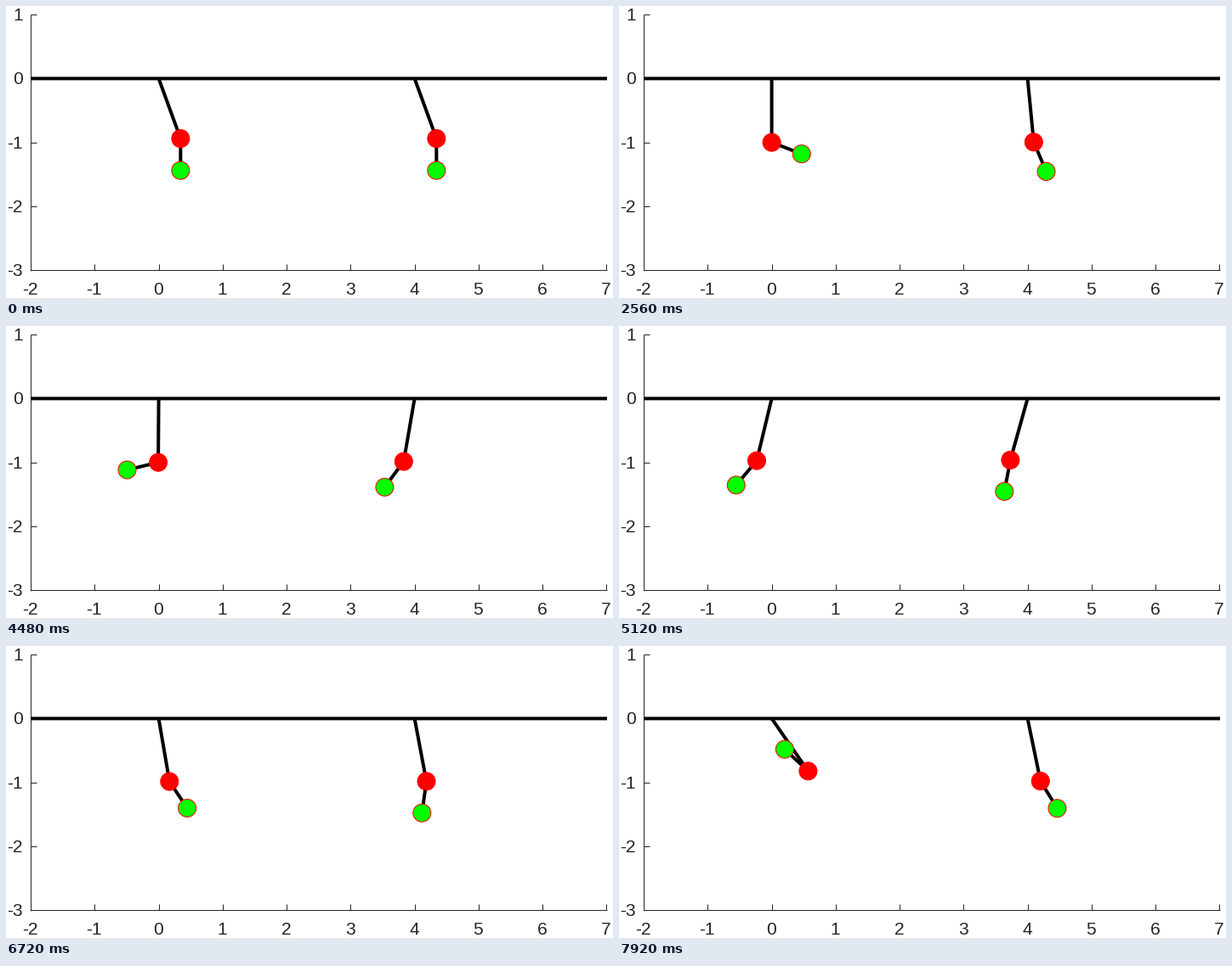
Write a matplotlib script that moves like this. It is 714 px wide and 344 px high and loops after 8 s.

```python
import numpy as np
import matplotlib.pyplot as plt
from matplotlib.animation import FuncAnimation
from matplotlib.patches import Circle

W, H, DPI = 714, 344, 64
PT = 72 / DPI                     # points per pixel
FRAMES, STEP = 100, 80
LEFT, BOTTOM, UNIT = 29.1, 311.2, 75.25
INK = "#262626"
L1, L2 = 1.0, 0.5
RELEASE = 20.2                    # frame at which the swing begins


def px(x):
    return LEFT + (x + 2) * UNIT


def py(y):
    return BOTTOM - (y + 3) * UNIT


def spline(*keys):
    """Smooth curve through (frame, value) keys, held at both ends."""
    t, v = np.array(keys, float).T
    m = np.gradient(v, t)

    def at(f):
        f = min(max(f, t[0]), t[-1])
        i = min(np.searchsorted(t, f, "right") - 1, len(t) - 2)
        h = t[i + 1] - t[i]
        s = (f - t[i]) / h
        return ((1 + 2 * s) * (1 - s) ** 2 * v[i] + s * (1 - s) ** 2 * h * m[i]
                + s * s * (3 - 2 * s) * v[i + 1] + s * s * (s - 1) * h * m[i + 1])

    return at


# Turning points of the driven pendulum, degrees from straight down
hip = spline((18, 20), (22, 19.6), (26, 16), (38, -11.9), (42, -8.3),
             (56, -0.4), (68, -17), (73, -12.7), (84, 9.7), (99, 34.7))
knee = spline((18, 0), (22, 1), (34, 85), (42, 147), (54, -79),
              (56, -76.5), (73, 9.7), (84, 33.6), (99, 227))


def driven(f):
    return hip(f), knee(f)


def free(f):
    """Small double pendulum swing: a slow and a fast mode, eased in."""
    phase = 0.0808 * 0.8 * np.logaddexp(0, (f - RELEASE) / 0.8)
    slow, fast = np.cos(phase), np.cos(2.325 * phase)
    return 14.88 * slow + 5.12 * fast, 19.5 * (slow - fast)


def joints(x0, angles):
    a, b = np.radians(angles)
    x = x0 + np.array([0, L1 * np.sin(a), L1 * np.sin(a) + L2 * np.sin(b)])
    y = -np.array([0, L1 * np.cos(a), L1 * np.cos(a) + L2 * np.cos(b)])
    return px(x), py(y)


fig = plt.figure(figsize=(W / DPI, H / DPI), dpi=DPI, facecolor="white")
ax = fig.add_axes([0, 0, 1, 1])
ax.set_xlim(0, W)
ax.set_ylim(H, 0)
ax.axis("off")


def rule(x, y, width=1, color=INK, z=1, snap=True):
    return ax.plot(x, y, color=color, lw=width * PT, solid_capstyle="butt",
                   zorder=z, snap=snap)[0]


def label(x, y, n, ha):
    ax.text(x, y, str(n), ha=ha, va="baseline", color=INK,
            family="Liberation Sans", size=21 * PT)


rule([LEFT, LEFT], [10, 312])
rule([29, 707], [BOTTOM, BOTTOM])
for n in range(-2, 8):
    rule([px(n)] * 2, [BOTTOM, BOTTOM - 7])
    label(px(n) - 0.5, 340, n, "center")
for n in range(-3, 2):
    rule([LEFT, LEFT + 7], [py(n)] * 2)
    label(20, py(n) + 7, n, "right")
rule([29, 707], [py(0)] * 2, 4, "black", 2, snap=False)


class Pendulum:
    def __init__(self, x0, pose):
        self.x0, self.pose = x0, pose
        self.rods = [rule([], [], 4, "black", 3, snap=False) for _ in range(2)]
        self.bobs = [ax.add_patch(Circle((0, 0), 10.5, fc=fill, ec="red",
                                         lw=PT, zorder=4))
                     for fill in ("red", "lime")]

    def draw(self, f):
        x, y = joints(self.x0, self.pose(f))
        for i in range(2):
            self.rods[i].set_data(x[i:i + 2], y[i:i + 2])
            self.bobs[i].center = x[i + 1], y[i + 1]
        return self.rods + self.bobs


pendulums = [Pendulum(0, driven), Pendulum(4, free)]


def update(f):
    return [part for p in pendulums for part in p.draw(f)]


anim = FuncAnimation(fig, update, frames=FRAMES, interval=STEP, repeat=True,
                     repeat_delay=0, init_func=lambda: update(0))
plt.show()
```
